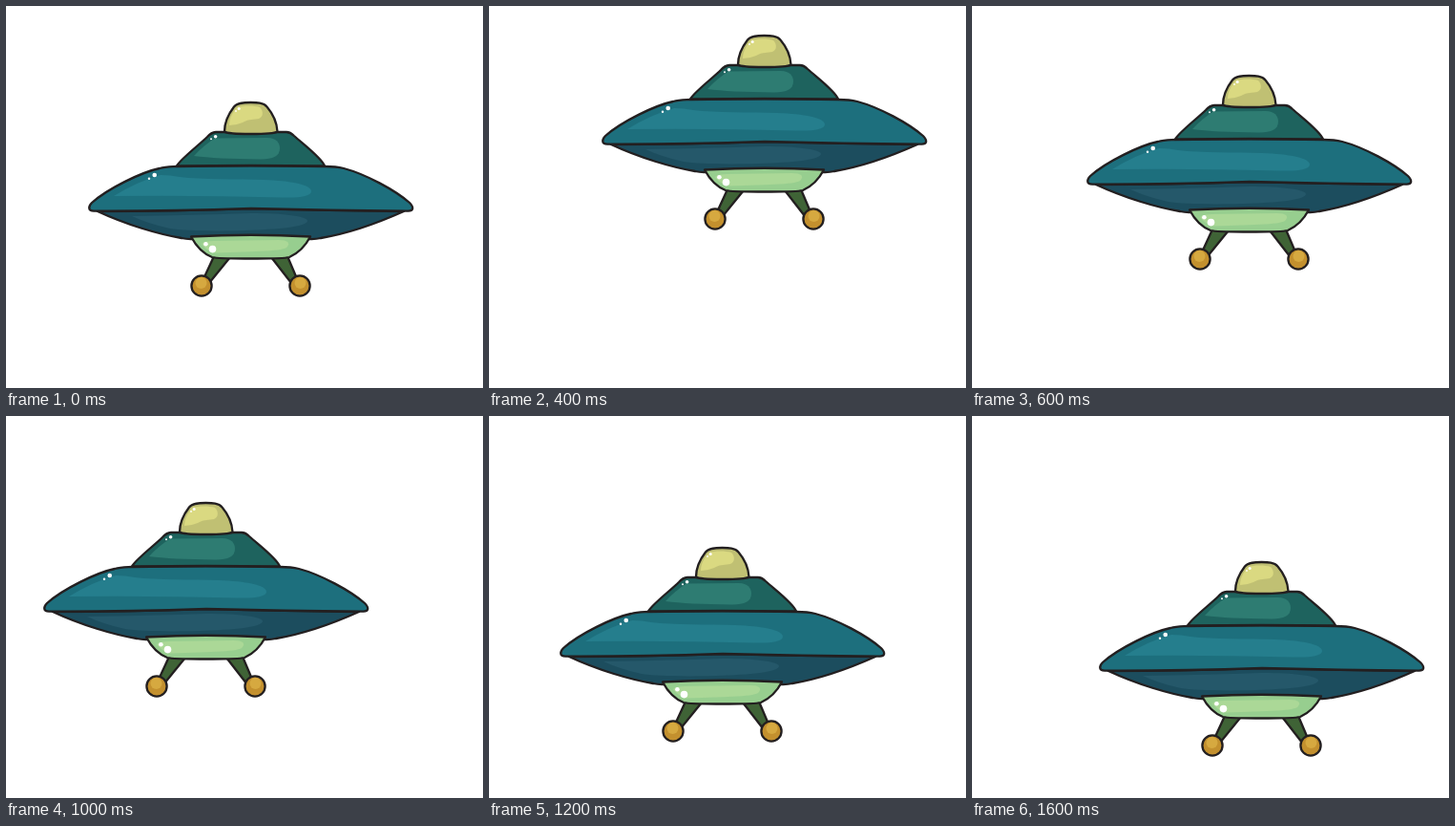
An HTML page with a canvas that plays this animation: 500x400 px, repeating every 1800 ms.

```html
<!DOCTYPE html>
<html lang="en">
<head>
<meta charset="utf-8">
<title>Flying saucer</title>
<style>
html, body { margin: 0; width: 100%; height: 100%; overflow: hidden; background: #fff; }
canvas { display: block; }
</style>
</head>
<body>
<canvas id="stage" width="500" height="400"></canvas>
<script>
const ctx = document.getElementById("stage").getContext("2d");
const INK = "#231f20";
const STEP = 200;

// Saucer offset from its starting place, one hop per step
const hops = [
  [0, 0], [-46, -49], [32, -70], [34, -28], [61, -34],
  [-47, -10], [-12, 37], [10, 52], [47, 52]
];

function shape(d, fill, outlined) {
  const path = new Path2D(d);
  ctx.fillStyle = fill;
  ctx.fill(path);
  if (outlined) ctx.stroke(path);
}

function disc(x, y, r, fill, outlined) {
  ctx.beginPath();
  ctx.arc(x, y, r, 0, Math.PI * 2);
  ctx.fillStyle = fill;
  ctx.fill();
  if (outlined) ctx.stroke();
}

function glint(x, y, r) {
  disc(x, y, r, "#fff");
}

function drawLegs() {
  shape("M218 262 L206 288 L213 290 L235 263 Z", "#3f6336", true);
  shape("M278 263 L299 290 L306 288 L295 262 Z", "#3f6336", true);
  for (const x of [205, 308]) {
    disc(x, 293, 10.6, "#c3902e", true);
    disc(x - 0.5 + (x > 256 ? 1 : 0), 290, 6, "#d6a940");
  }
}

function drawHull() {
  shape("M96 215 C126 229 160 239 184 243 Q190 244.5 197 244 L317 244 Q324 244.5 330 243 C354 239 388 228 417 215 Q340 214 257 212 Q170 215 96 215 Z", "#1c4d5e", true);
  shape("M132 220 Q200 219 257 217 C290 217 316 220 316 225 C316 231 285 234 250 235 C215 236 185 235 172 233 Q149 228 132 220 Z", "#25586a");
  shape("M92 214.7 C86 214.5 86 210 90 206 C107 191 142 174 161 170 C167 168.4 173 168.4 179 168 Q257 166.5 334 168 C342 168 348 168.5 354 170 C377 176 408 193 423 206 C428 211 427 215 421 214.7 Q340 214.3 257 212 Q170 215 92 214.7 Z", "#1d6f7d", true);
  shape("M113 199 Q137 184 162 177 Q172 177 182 179 C205 182 240 181 270 182 C298 183 320 187 320 194 C320 199 308 201 291 200.5 Q200 198 113 199 Z", "#257e8d");
  glint(155.7, 177, 2.3);
  glint(150, 180.7, 1.2);
}

function drawBowl() {
  shape("M194 241.5 Q257 238 319 241.5 C314 251 306 259 297 263 Q290 264.7 257 264.5 Q223 264.7 216 263 C206 259 199 251 194 241.5 Z", "#97ce8f", true);
  shape("M205 249 Q208 246 218 246 L286 245 C295 245 298 248 295 252 C291 257 265 257 218 258.5 Q209 255 205 249 Z", "#abd897");
  glint(216.5, 254.6, 3.8);
  glint(209.4, 249.3, 2.3);
}

function drawCabin() {
  shape("M179 167.5 C182 161 203 145 211 137 Q215 132.5 220 132 L294 132 Q298 132 302 136 C312 145 331 159 334 167.5 Q257 166.5 179 167.5 Z", "#1e635e", true);
  shape("M197 157 Q207 146 219 138.5 L274 138 C283 138 287 143 287 149 C287 157 280 160.5 267 160.5 Q220 160 197 157 Z", "#2e7c72");
  glint(219.6, 136.8, 1.8);
  glint(215, 139.3, 1);
}

function drawDome() {
  shape("M229 131.5 C229 122 234 112 239 105.5 C242 101 250 101 256.5 101 C263 101 270 101 273.5 105.5 C279 112 284 122 284.5 131.5 Q281 134 256.5 134 Q232 134 229 131.5 Z", "#c0c073", true);
  shape("M234 125 C234 117 239 109 243 106 C249 104 260 104 266 106 C270 110 270 116 265 118 C260 119 255 118 248 122 Q241 125 234 125 Z", "#dad981");
  glint(244.2, 107.6, 1.5);
  glint(241, 110, 0.9);
}

function draw(now) {
  const [x, y] = hops[Math.floor(now / STEP) % hops.length];
  ctx.setTransform(1, 0, 0, 1, 0, 0);
  ctx.fillStyle = "#fff";
  ctx.fillRect(0, 0, 500, 400);
  ctx.translate(x, y);
  ctx.strokeStyle = INK;
  ctx.lineWidth = 2.3;
  ctx.lineJoin = "round";
  drawLegs();
  drawHull();
  drawBowl();
  drawCabin();
  drawDome();
}

const start = performance.now();
function tick() {
  draw(performance.now() - start);
  requestAnimationFrame(tick);
}
tick();
</script>
</body>
</html>
```
